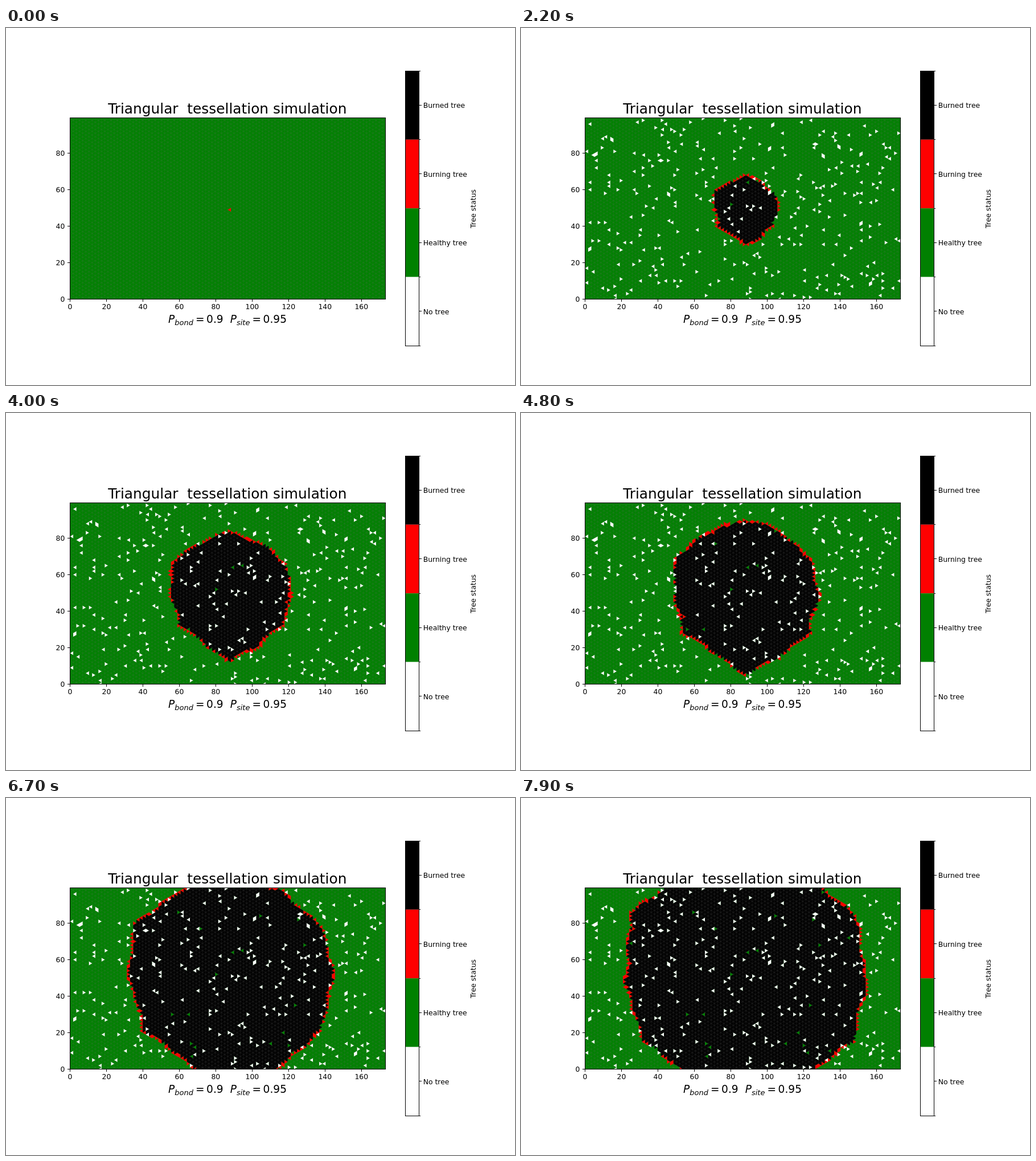
Recreate the animation shown at these times as an HTML page with a canvas. Size 894 by 626 pixels, loop 8 s.

```html
<!DOCTYPE html>
<html lang="en">
<head>
<meta charset="utf-8">
<title>Triangular tessellation simulation</title>
<style>
html, body { margin: 0; width: 100%; height: 100%; overflow: hidden; background: #fff; }
canvas, svg { position: absolute; left: 0; top: 0; }
text { font-family: "DejaVu Sans", sans-serif; font-size: 12.42px; white-space: pre; }
path { shape-rendering: crispEdges; }
.title { font-size: 24.83px; }
.math { font-size: 18.6px; }
.var, .sub { font-style: italic; }
.sub { font-size: 13px; }
</style>
</head>
<body>
<canvas id="field" width="894" height="626"></canvas>
<svg id="chart" width="894" height="626" viewBox="0 0 894 626">
  <text class="title" x="388.8" y="150" text-anchor="middle">Triangular  tessellation simulation</text>
  <text class="math" x="389" y="517" text-anchor="middle"><tspan class="var">P</tspan><tspan class="sub" dy="3.5">bond</tspan><tspan dx="4" dy="-3.5">=</tspan><tspan dx="3.6">0.9</tspan><tspan class="var" dx="12">P</tspan><tspan class="sub" dy="3.5">site</tspan><tspan dx="4" dy="-3.5">=</tspan><tspan dx="3.6">0.95</tspan></text>
  <text transform="translate(824.5 317) rotate(-90)" text-anchor="middle">Tree status</text>
</svg>
<script>
const LEFT = 112.5, RIGHT = 666.5, TOP = 157.5, BOTTOM = 475.5;
const COLS = 100, ROWS = 100, STEP_MS = 100, STEPS = 80;
const COL_W = (RIGHT - LEFT) / COLS, UNIT = COL_W / Math.sqrt(3);
const HEIGHT = BOTTOM - TOP, WIDTH = RIGHT - LEFT;

// Axes, ticks and colour bar
const chart = document.getElementById("chart");
function add(tag, attrs, content = "") {
  const el = document.createElementNS("http://www.w3.org/2000/svg", tag);
  for (const key in attrs) el.setAttribute(key, attrs[key]);
  el.textContent = content;
  chart.append(el);
}
const line = d => add("path", { d, fill: "none", stroke: "#000" });
const label = (x, y, anchor, s) => add("text", { x, y, "text-anchor": anchor }, s);
const crisp = v => Math.floor(v) + 0.5;

line(`M${LEFT} ${TOP}H${RIGHT}V${BOTTOM}H${LEFT}z`);
for (let v = 0; v <= 160; v += 20) {
  const x = LEFT + v * UNIT, y = BOTTOM - v * UNIT;
  line(`M${crisp(x)} ${BOTTOM}v4.5`);
  label(x, 493, "middle", v);
  if (v > 80) continue;
  line(`M${LEFT} ${crisp(y)}h-4.5`);
  label(103.3, y + 4.2, "end", v);
}

const BAR_LEFT = 701.5, BAR_RIGHT = 725.5, BAR_TOP = 75.3, BAR_H = 120.45;
const barY = k => BAR_TOP + k * BAR_H;
[["Burned tree", "#000"], ["Burning tree", "red"], ["Healthy tree", "green"], ["No tree", "#fff"]]
  .forEach(([name, fill], k) => {
    const mid = barY(k + 0.5);
    add("rect", { x: BAR_LEFT, y: barY(k), width: BAR_RIGHT - BAR_LEFT, height: BAR_H, fill });
    line(`M${BAR_RIGHT} ${crisp(mid)}h4.5`);
    label(732.7, mid + 4.7, "start", name);
  });
for (let k = 0; k <= 4; k++) line(`M${BAR_RIGHT} ${crisp(barY(k))}h2.5`);
line(`M${BAR_LEFT} ${crisp(BAR_TOP)}H${BAR_RIGHT}V${crisp(barY(4))}H${BAR_LEFT}z`);

let seed = 4711;
function random() {
  seed = (Math.imul(seed, 1664525) + 1013904223) >>> 0;
  return seed / 4294967296;
}

// Share of the fire's pace lost every 30 degrees, counterclockwise from the right
const drag = [0, 0.11, 0.01, 0.11, 0.01, 0.07, 0.02, 0.19, 0.12, 0.07, 0.04, 0.14];
function dragAt(dc, dr) {
  const turn = Math.atan2(dr, dc * Math.sqrt(3)) / (2 * Math.PI) + 1;
  const pos = (turn * drag.length) % drag.length;
  const k = Math.floor(pos);
  return drag[k] + (drag[(k + 1) % drag.length] - drag[k]) * (pos - k);
}

// Number of shared edges crossed from the centre site
function distance(dc, dr) {
  const a = Math.abs(dc), b = Math.abs(dr), odd = (a + b) % 2;
  return b >= a ? a + b : 2 * a + (dc > 0 ? -odd : odd);
}

// The step at which the fire reaches a site; a few sites never catch it
function ignition(dc, dr) {
  const d = distance(dc, dr), luck = random();
  if (d < 3) return d;
  if (luck < 0.003) return Infinity;
  const ripple = Math.sin(dc * 0.5 + dr * 0.2) + Math.sin(dr * 0.35 - dc * 0.3);
  return d + Math.round(1.2 + d * dragAt(dc, dr) + ripple * 0.7) + (luck < 0.06 ? 1 : 0);
}

const EMPTY_SHARE = 0.033;
const sites = [];
for (let col = 0; col < COLS; col++) {
  for (let row = 0; row < ROWS; row++) {
    const dc = col - 50, dr = row - 49;
    const empty = random() < EMPTY_SHARE && distance(dc, dr) > 2;
    sites.push({ col, row, empty, start: ignition(dc, dr) });
  }
}

function triangle(path, { col, row }) {
  const x = LEFT + col * COL_W, y = BOTTOM - row * UNIT;
  const right = (col + row) % 2 === 0;
  const base = right ? x : x + COL_W, tip = right ? x + COL_W : x;
  const h = right ? UNIT : -UNIT;
  path.moveTo(base, y - h);
  path.lineTo(tip, y);
  path.lineTo(base, y + h);
  path.closePath();
}

const grid = new Path2D();
for (let x = LEFT; x <= RIGHT; x += COL_W) {
  grid.moveTo(x, TOP);
  grid.lineTo(x, BOTTOM);
}
for (let r = 1 - COLS; r <= ROWS + COLS; r += 2) {
  const y = BOTTOM - r * UNIT, rise = COLS * UNIT;
  grid.moveTo(RIGHT, y - rise);
  grid.lineTo(LEFT, y);
  grid.lineTo(RIGHT, y + rise);
}

const ctx = document.getElementById("field").getContext("2d");
ctx.beginPath();
ctx.rect(LEFT, TOP, WIDTH, HEIGHT);
ctx.clip();
ctx.lineWidth = 0.6;
ctx.strokeStyle = "rgba(110,110,110,.3)";

function draw(step) {
  const burned = new Path2D(), burning = new Path2D(), bare = new Path2D();
  for (const site of sites) {
    if (site.empty) {
      if (step > 0) triangle(bare, site);
    } else if (site.start < step) triangle(burned, site);
    else if (site.start === step) triangle(burning, site);
  }
  ctx.fillStyle = "green";
  ctx.fillRect(LEFT, TOP, WIDTH, HEIGHT);
  ctx.fillStyle = "#000";
  ctx.fill(burned);
  ctx.stroke(grid);
  ctx.fillStyle = "red";
  ctx.fill(burning);
  ctx.fillStyle = "#fff";
  ctx.fill(bare);
}

let shown = -1;
const begin = performance.now();
function tick() {
  const step = Math.floor((performance.now() - begin) / STEP_MS) % STEPS;
  if (step !== shown) draw(shown = step);
  requestAnimationFrame(tick);
}
tick();
</script>
</body>
</html>
```
